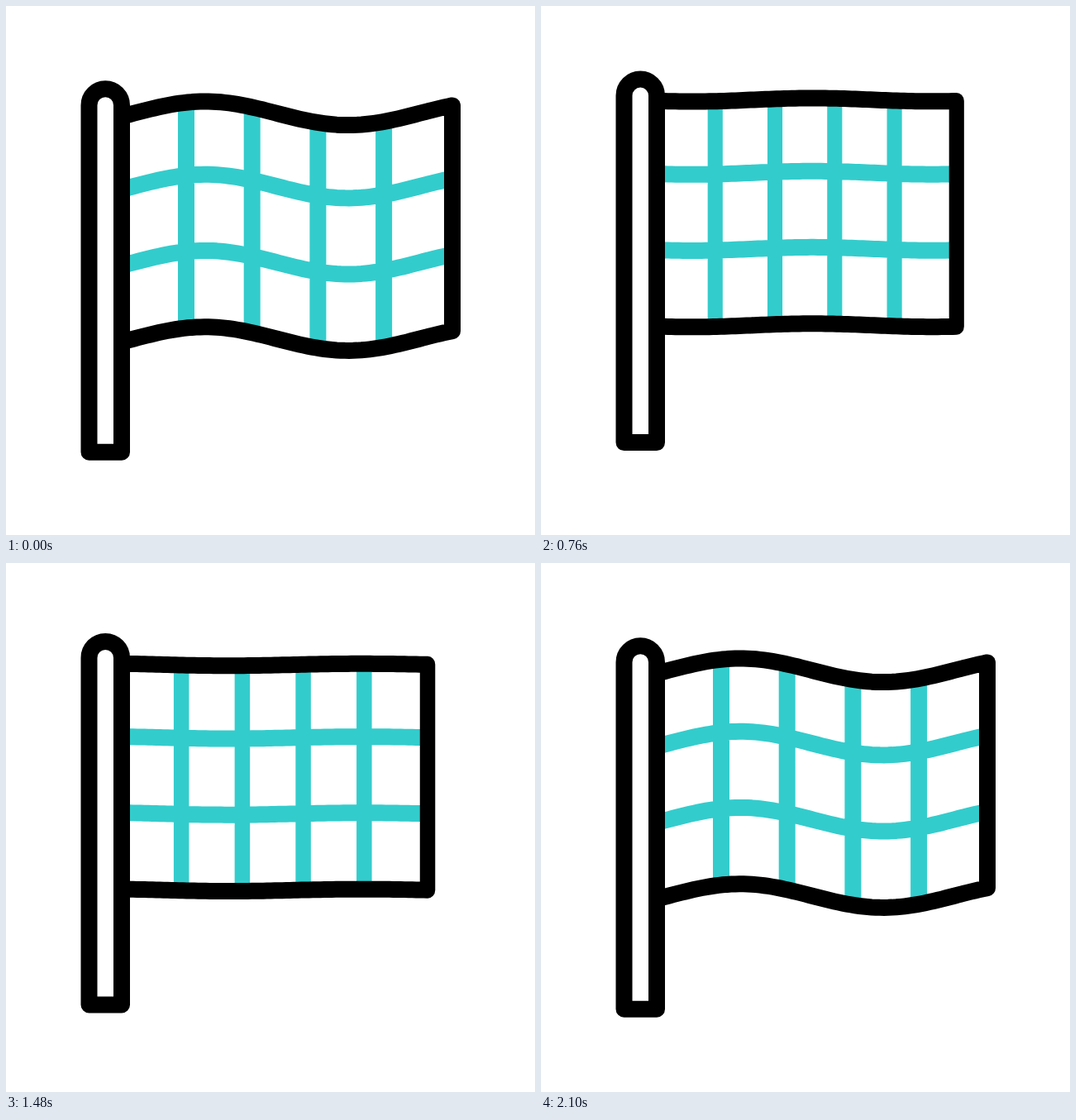
Animation, 640 px wide and 640 px high, one loop 2200 ms. Source, as an HTML page:

```html
<!DOCTYPE html>
<html lang="en">
<head>
<meta charset="utf-8">
<title>Waving flag</title>
<style>
  html, body { margin: 0; width: 100%; height: 100%; overflow: hidden; background: #fff; }
  svg { display: block; width: 100%; height: 100%; }
  path { fill: none; stroke: #000; stroke-width: 20; stroke-linejoin: round; }
  #grid { stroke: #3cc; }
  #pole { fill: #fff; }
</style>
</head>
<body>
<svg viewBox="0 0 640 640">
  <g id="all">
    <g id="flag">
      <path id="grid"/>
      <path id="edge"/>
    </g>
    <path id="pole" d="M100.5 539.8V120a19.75 19.75 0 0 1 39.5 0V539.8Z"/>
  </g>
</svg>
<script>
const LOOP = 2200, STEP = 20;
const LEFT = 140, RIGHT = 540, HEIGHT = 272.8, ROW = 92.1, COLUMN = 79.7;

// A cosine along the cloth: mean height, swing, place of a crest, half a wavelength
const wave = (mean, swing, crest, half) =>
  x => mean - swing * Math.cos(Math.PI * (x - crest) / half);
const rest = wave(129.8, 14.3, 241, 173);
const crest = wave(110.7, 14, 329, 165);
const trough = wave(142.2, 12.6, 155, 167);

// Each part swings between turning points; stretch and shape lag behind the lift
const SHAPE = [[210, rest], [590, crest], [950, trough], [1310, crest], [1625, trough], [1995, rest]];
const LIFT = [[200, 0], [530, 25], [872, -24], [1240, 25], [1560, -11], [1880, 0]];
const STRETCH = [[200, 1], [720, .9], [1040, 1.061], [1380, .888], [1715, 1.061], [2080, 1]];

const $ = id => document.getElementById(id);
const mix = (a, b, k) => a + (b - a) * k;

// The two neighbouring keys and the eased share of the second
function between(keys, t) {
  let i = 1;
  while (i < keys.length - 1 && t > keys[i][0]) i++;
  const [t0, a] = keys[i - 1], [t1, b] = keys[i];
  const u = Math.min(1, Math.max(0, (t - t0) / (t1 - t0)));
  return [a, b, u * u * (3 - 2 * u)];
}

function draw(t) {
  const [from, to, k] = between(SHAPE, t);
  const top = x => mix(from(x), to(x), k);
  const lift = mix(...between(LIFT, t));
  const stretch = mix(...between(STRETCH, t));

  const xs = [];
  for (let x = LEFT; x <= RIGHT; x += 5) xs.push(x);
  const line = (dy, list = xs) => list.map(x => `${x} ${top(x) + dy}`).join('L');

  let grid = '';
  for (let n = 0; n < 2; n++) grid += 'M' + line(88.3 + ROW * n);
  for (let n = 0; n < 4; n++) {
    const x = 218 + COLUMN * n;
    grid += `M${x} ${top(x)}v${HEIGHT}`;
  }

  $('all').setAttribute('transform', `translate(0 ${lift})`);
  $('flag').setAttribute('transform', `translate(${LEFT * (1 - stretch)} 0) scale(${stretch} 1)`);
  $('grid').setAttribute('d', grid);
  $('edge').setAttribute('d', `M${line(0)}L${line(HEIGHT, [...xs].reverse())}`);
}

const start = performance.now();
function tick() {
  const t = (performance.now() - start) % LOOP;
  draw(Math.floor(t / STEP) * STEP);
  requestAnimationFrame(tick);
}
tick();
</script>
</body>
</html>
```
